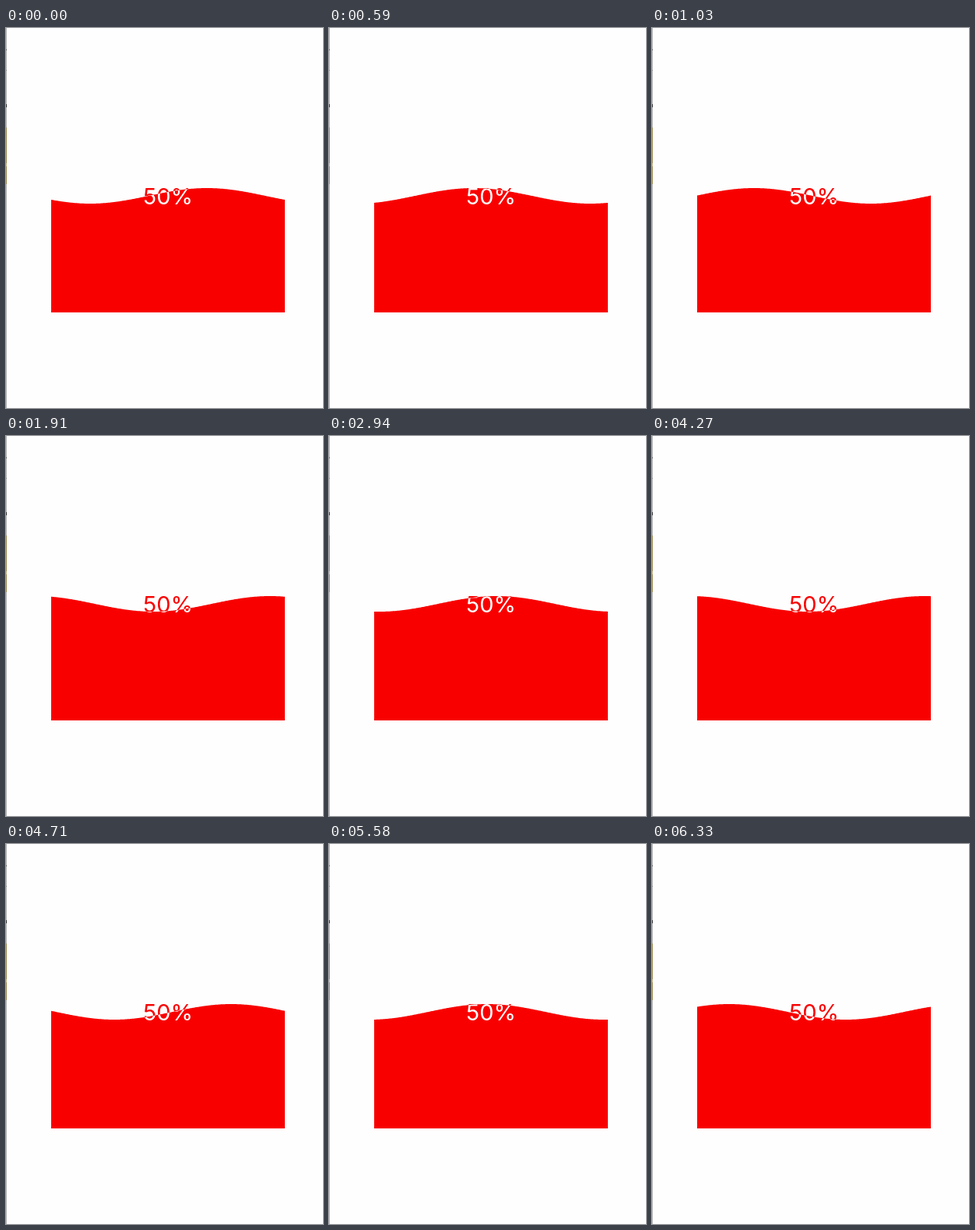
An HTML page with a canvas that plays this animation: 407x489 px, repeating every 6430 ms.

```html
<!DOCTYPE html>
<html lang="en">
<head>
<meta charset="utf-8">
<title>Wave progress</title>
<style>
  html, body { margin: 0; width: 100%; height: 100%; overflow: hidden; background: #fefefe; }
  canvas { display: block; }
</style>
</head>
<body>
<canvas width="407" height="489"></canvas>
<script>
const ctx = document.querySelector("canvas").getContext("2d");
const RED = "#f80000", LOOP = 6430, STEP = 147.1, LAST_STEP = 43;
const box = { left: 58, right: 358, bottom: 366 };
const wave = { level: 216, height: 10, length: 300 };

// [step, crest x]: the crest drifts left at a slightly uneven pace
const drift = [[0, 258], [7, 131], [13, 39], [20, -85], [25, -169], [32, -311], [43, -501]];

function crestAt(step) {
  const i = Math.max(1, drift.findIndex(([s]) => s >= step));
  const [s0, x0] = drift[i - 1], [s1, x1] = drift[i];
  return x0 + (x1 - x0) * (step - s0) / (s1 - s0);
}

function rect(color, x, y, w, h) {
  ctx.fillStyle = color;
  ctx.fillRect(x, y, w, h);
}

function label(color) {
  ctx.fillStyle = color;
  ctx.fillText("50%", 208, 227);
}

function leftEdge() {
  rect("#b4b4b4", 0, 0, 1, 489);
  rect("#777", 0, 27, 1, 2);
  rect("#888", 0, 54, 1, 1);
  rect("#333", 0, 98, 1, 4);
  rect("#a08a50", 0, 128, 1, 73);
  rect("#c4b486", 0, 174, 1, 4);
}

function draw(time) {
  const step = Math.min(LAST_STEP, Math.floor((time % LOOP + 6) / STEP));
  const crest = crestAt(step);
  rect("#fefefe", 0, 0, 407, 489);
  leftEdge();
  ctx.font = "29px Inter, sans-serif";
  ctx.textAlign = "center";
  label(RED);

  ctx.save();
  ctx.beginPath();
  ctx.moveTo(box.left, box.bottom);
  for (let x = box.left; x <= box.right; x++) {
    ctx.lineTo(x, wave.level - wave.height * Math.cos((x - crest) / wave.length * 2 * Math.PI));
  }
  ctx.lineTo(box.right, box.bottom);
  ctx.closePath();
  ctx.fillStyle = RED;
  ctx.fill();
  ctx.clip();
  label("#fff");
  ctx.restore();
}

function tick() {
  draw(performance.now());
  requestAnimationFrame(tick);
}
tick();
</script>
</body>
</html>
```
